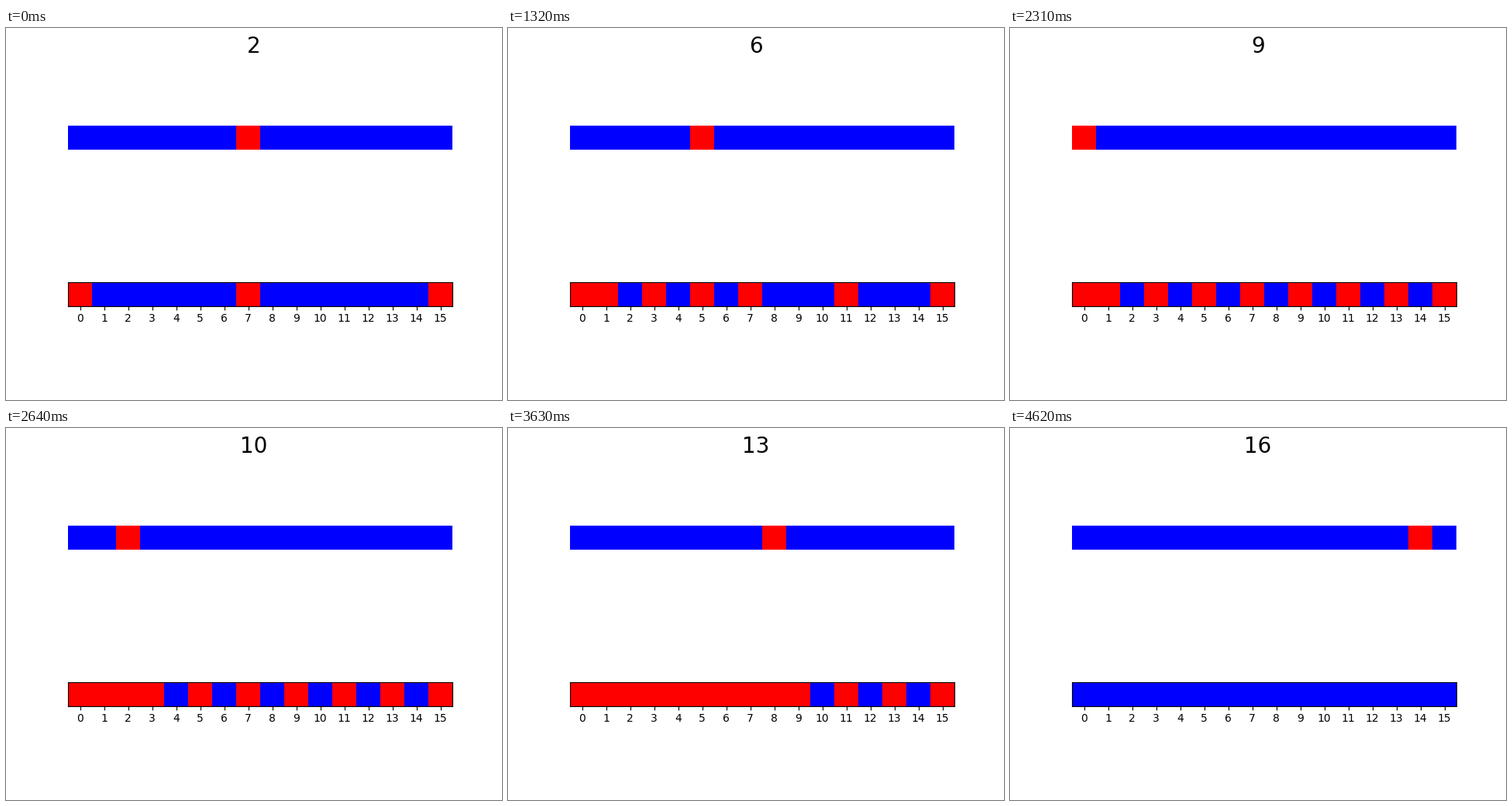
Recreate the animation shown at these times as a matplotlib script. Size 640 by 480 pixels, loop 4.95 s.

```python
import numpy as np
import matplotlib.pyplot as plt
from matplotlib.animation import FuncAnimation
from matplotlib.colors import ListedColormap

CELLS = 16
INTERVAL = 330

# Bisection order: midpoints of ever smaller intervals
order = [i for step in (16, 8, 4, 2)
         for i in range(step // 2 - 1, CELLS - 1, step)]

plt.rcParams["font.family"] = "DejaVu Sans"
fig, (ax_now, ax_seen) = plt.subplots(2, 1, figsize=(6.4, 4.8), dpi=100)
cmap = ListedColormap(["blue", "red"])


def strip(ax):
    return ax.imshow(np.zeros((1, CELLS)), cmap=cmap, vmin=0, vmax=1,
                     interpolation="nearest")


now = strip(ax_now)
seen = strip(ax_seen)
ax_now.axis("off")
ax_seen.set_xticks(range(CELLS))
ax_seen.set_yticks([])
title = fig.suptitle("2", fontsize=20)


def row(indices):
    cells = np.zeros((1, CELLS))
    cells[0, indices] = 1
    return cells


def update(k):
    visited = row([0, CELLS - 1] + order[:k + 1])
    # A completely filled strip turns back to blue
    if visited.all():
        visited[:] = 0
    now.set_data(row([order[k]]))
    seen.set_data(visited)
    title.set_text(str(k + 2))
    return now, seen, title


anim = FuncAnimation(fig, update, frames=len(order), interval=INTERVAL,
                     init_func=lambda: update(0), repeat=True, repeat_delay=0)
plt.show()
```
